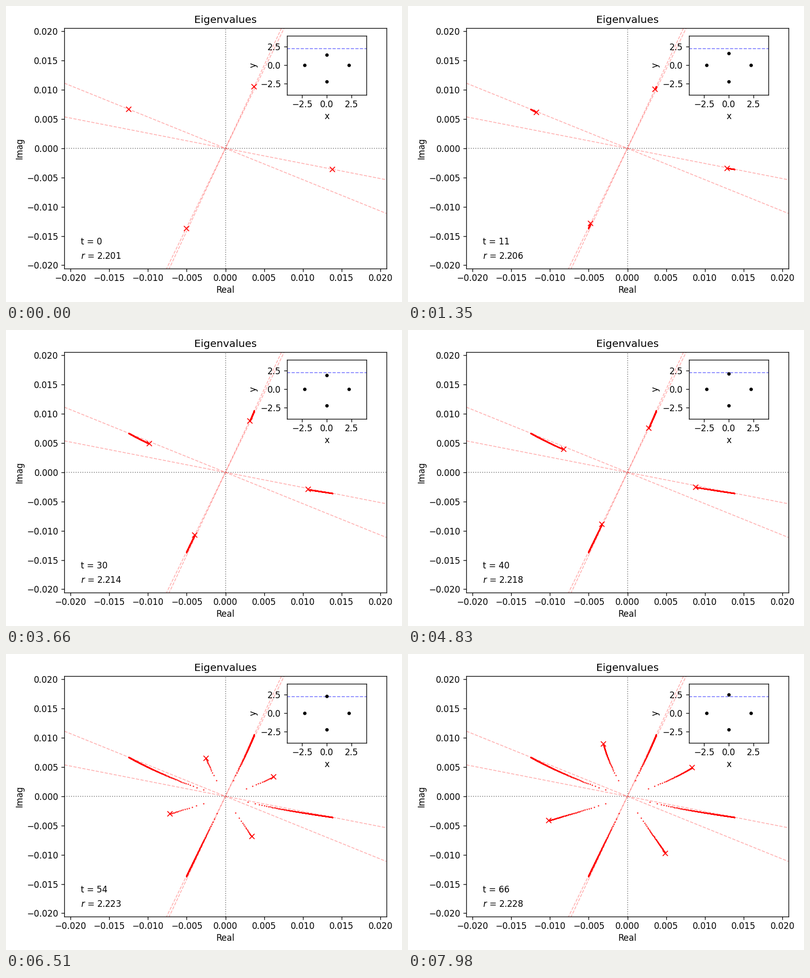
A matplotlib script that plays this animation: 768 by 576 pixels, repeating every 8 s.

```python
import numpy as np
import matplotlib.pyplot as plt
from matplotlib.animation import FuncAnimation

WIDTH, HEIGHT = 768, 576
LEFT, RIGHT, TOP, BOTTOM = 113.4, 737.6, 43.4, 510.5
FRAMES = 267
LOOP_MS = 8000
R_CRIT = np.pi / np.sqrt(2)
MIDDLE = 199.5          # step at which all four eigenvalues meet at zero
X_LIM, Y_LIM = 0.02076, 0.02053


def eigenvalues(n):
    """Roots of a traceless quartic whose coefficients vanish at MIDDLE."""
    m = MIDDLE - n
    quad = m * (-0.0743 + (0.118 + 0.00003 * m) * 1j)
    lin = m * (-5.5 - 0.0006 * m + (-2.77 + 0.0004 * m) * 1j)
    const = m * (-24.2 + 0.0107 * m + 164.67j)
    return np.roots([1, 0, quad, lin, const]) * 1e-3


values = np.array([eigenvalues(n) for n in range(FRAMES)])

plt.rcParams.update({"font.family": "DejaVu Sans", "font.size": 10,
                     "xtick.major.pad": 2.6, "axes.labelpad": 3})
fig = plt.figure(figsize=(WIDTH / 120, HEIGHT / 120), dpi=120)
ax = fig.add_axes([LEFT / WIDTH, 1 - BOTTOM / HEIGHT,
                   (RIGHT - LEFT) / WIDTH, (BOTTOM - TOP) / HEIGHT])
ax.set(xlim=(-X_LIM, X_LIM), ylim=(-Y_LIM, Y_LIM),
       xlabel="Real", ylabel="Imag", title="Eigenvalues")

ax.axhline(0, color="k", ls=":", lw=1, alpha=0.5)
ax.axvline(0, color="k", ls=":", lw=1, alpha=0.5)
span = np.array([-X_LIM, X_LIM])
for v in values[0]:
    ax.plot(span, span * v.imag / v.real, "r--", lw=1, alpha=0.3)

trail, = ax.plot([], [], "r.", ms=1)
crosses, = ax.plot([], [], "rx")
t_text = ax.text(0.05, 0.10, "", transform=ax.transAxes)
r_text = ax.text(0.05, 0.04, "", transform=ax.transAxes)

inset = fig.add_axes([0.71, 0.7, 0.2, 0.2])
inset.set(xlim=(-4, 4), ylim=(-4, 4), xlabel="x", ylabel="y")
inset.axhline(R_CRIT, color="b", ls="--", lw=1, alpha=0.5)
inset.plot([-R_CRIT, R_CRIT, 0], [0, 0, -R_CRIT], "k.")
mover, = inset.plot([], [], "k.")


def update(n):
    past = values[:n + 1].ravel()
    trail.set_data(past.real, past.imag)
    crosses.set_data(values[n].real, values[n].imag)
    mover.set_data([0], [R_CRIT - 0.8 + 0.004 * n])
    t_text.set_text(f"t = {n // 4}")
    r_text.set_text(f"$r$ = {R_CRIT - 0.02 + 0.0001 * n:.3f}")
    return trail, crosses, mover, t_text, r_text


ani = FuncAnimation(fig, update, frames=FRAMES, init_func=lambda: update(0),
                    interval=LOOP_MS / FRAMES, repeat=True, repeat_delay=0)
plt.show()
```
